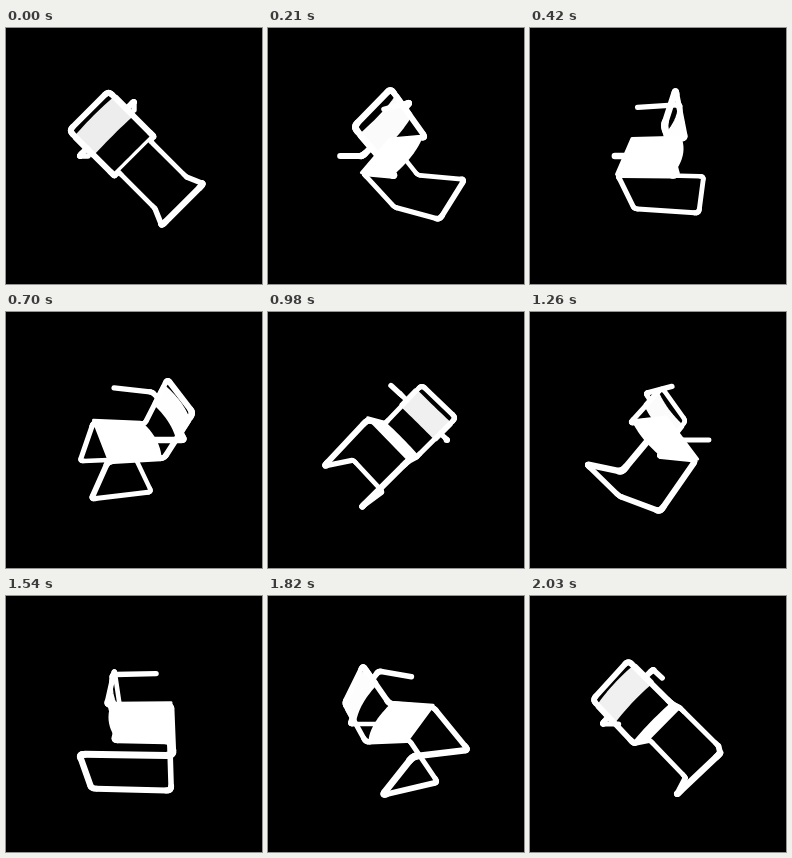
Write an HTML page with a canvas that moves like this. It is 256 px wide and 256 px high and loops after 2100 ms.

```html
<!DOCTYPE html>
<html lang="en">
<head>
<meta charset="utf-8">
<title>Turning chair</title>
<style>
html, body { margin: 0; width: 100%; height: 100%; overflow: hidden; background: #000; }
canvas { display: block; width: 100vw; height: 100vh; }
</style>
</head>
<body>
<canvas id="stage" width="256" height="256"></canvas>
<script>
const ctx = document.getElementById('stage').getContext('2d');
const LOOP = 2100, STEPS = 30, DIST = 260, TUBE = 5.4;

// Chair points are [side, up, back].
const W = 25.3, TOP = 58, FLOOR = -59, REAR = 24, FRONT = -36, BAR = 37;
const ARM = 35.3, ARM_REAR = 22, ARM_TIP = -22;
const SEAT_W = 26.4, SEAT_UP = 1.2, PANEL_W = 27;

const mix = (a, b, t) => a.map((v, i) => v + (b[i] - v) * t);
const dist = (a, b) => Math.hypot(a[0] - b[0], a[1] - b[1], a[2] - b[2]);

// Rounds the corners of a polyline in space.
function bend(points, radius, closed) {
  const n = points.length, out = [];
  points.forEach((p, i) => {
    if (!closed && (i === 0 || i === n - 1)) {
      out.push(p);
      return;
    }
    const prev = points[(i + n - 1) % n], next = points[(i + 1) % n];
    const a = mix(p, prev, Math.min(0.5, radius / dist(p, prev)));
    const b = mix(p, next, Math.min(0.5, radius / dist(p, next)));
    for (let k = 0; k <= 4; k++) {
      const t = k / 4;
      out.push(mix(mix(a, p, t), mix(p, b, t), t));
    }
  });
  if (closed) out.push(out[0]);
  return out;
}

// Cross edge from one side to the other, bowed towards the back.
function bow(side, up, back, depth) {
  const out = [];
  for (let k = 0; k <= 12; k++) {
    const t = k / 6 - 1;
    out.push([side * t, up, back + depth * (1 - t * t)]);
  }
  return out;
}

const half = side => [
  [side, TOP, REAR], [side, 0, REAR], [side, -1, FRONT],
  [side, FLOOR, FRONT], [side, FLOOR, BAR]
];
const frame = bend([...half(W), ...half(-W).reverse()], 4.5, true);

const arms = [1, -1].map(s => bend([
  [s * W, ARM, REAR], [s * ARM, ARM, ARM_REAR], [s * ARM, ARM, ARM_TIP]
], 3, false));

const seat = [
  ...bow(SEAT_W, SEAT_UP, 18, 6),
  [SEAT_W, SEAT_UP, FRONT], [-SEAT_W, SEAT_UP, FRONT]
];
const panel = [
  ...bow(PANEL_W, 49.5, REAR, 5),
  ...bow(PANEL_W, 27.5, REAR, 5).reverse()
];

function project([side, up, back], angle) {
  const x = (side - up) * Math.SQRT1_2, y = (side + up) * Math.SQRT1_2;
  const c = Math.cos(angle), s = Math.sin(angle);
  const scale = DIST / (DIST - (back * c - x * s));
  return { x: 128 + (x * c + back * s) * scale, y: 128 - y * scale, scale };
}

function tube(points, angle) {
  const flat = points.map(p => project(p, angle));
  ctx.strokeStyle = '#fff';
  for (let i = 1; i < flat.length; i++) {
    const a = flat[i - 1], b = flat[i];
    ctx.lineWidth = TUBE * (a.scale + b.scale) / 2;
    ctx.beginPath();
    ctx.moveTo(a.x, a.y);
    ctx.lineTo(b.x, b.y);
    ctx.stroke();
  }
}

function sheet(points, angle, color) {
  ctx.fillStyle = ctx.strokeStyle = color;
  ctx.lineWidth = 3;
  ctx.beginPath();
  points.forEach(p => {
    const q = project(p, angle);
    ctx.lineTo(q.x, q.y);
  });
  ctx.closePath();
  ctx.fill();
  ctx.stroke();
}

function draw(time) {
  const step = Math.floor((time % LOOP) / LOOP * STEPS);
  const angle = step / STEPS * Math.PI * 2;
  // The back panel dims a little when it faces the viewer.
  const tone = Math.round(254 - 17 * Math.cos(angle) ** 8);
  ctx.fillStyle = '#000';
  ctx.fillRect(0, 0, 256, 256);
  ctx.lineCap = ctx.lineJoin = 'round';
  sheet(panel, angle, `rgb(${tone},${tone},${tone})`);
  sheet(seat, angle, '#fff');
  tube(frame, angle);
  arms.forEach(arm => tube(arm, angle));
}

const start = performance.now();
function tick() {
  draw(performance.now() - start);
  requestAnimationFrame(tick);
}
tick();
</script>
</body>
</html>
```
